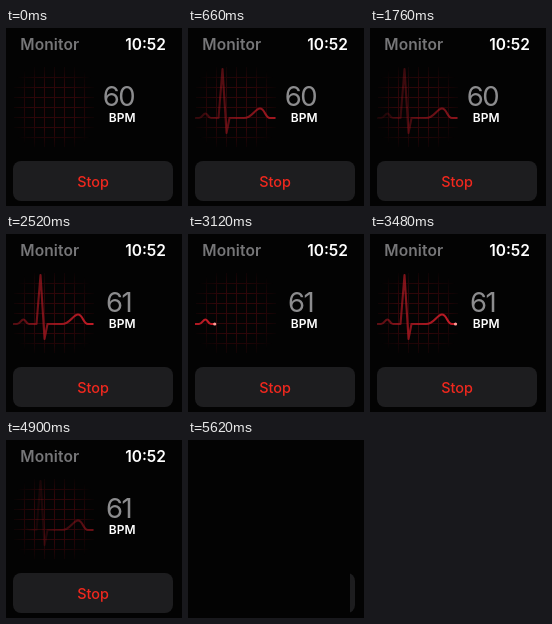
Write an HTML page that moves like this. It is 176x178 px and loops after 8 s.

```html
<!DOCTYPE html>
<html lang="en">
<head>
<meta charset="utf-8">
<title>Monitor</title>
<style>
html, body { margin: 0; width: 100%; height: 100%; overflow: hidden; background: #030303; }
svg { display: block; width: 100vw; height: 100vh; }
text { font-family: Inter, "Open Sans", sans-serif; font-weight: 600; fill: #fff; }
#rate { font-size: 27.5px; font-weight: 400; letter-spacing: -1.5px; fill: #8c8c8e; }
</style>
</head>
<body>
<svg viewBox="0 0 176 178">
  <defs>
    <linearGradient id="glow" gradientUnits="userSpaceOnUse" x1="-130" y1="0" x2="7" y2="0">
      <stop offset="0" stop-color="#c81c27" stop-opacity="0"/>
      <stop offset="1" stop-color="#c81c27"/>
      <stop offset="1" stop-color="#c81c27" stop-opacity="0"/>
    </linearGradient>
    <radialGradient id="vignette" r=".58">
      <stop offset=".5" stop-color="#fff"/>
      <stop offset="1" stop-color="#000"/>
    </radialGradient>
    <mask id="soft"><rect x="7" y="38" width="82" height="82" fill="url(#vignette)"/></mask>
  </defs>
  <g id="screen">
    <text x="14.2" y="22" font-size="15.5" letter-spacing=".15" style="fill:#767678">Monitor</text>
    <text x="160" y="22" font-size="15.5" text-anchor="end">10:52</text>
    <g mask="url(#soft)"><path id="grid" stroke="#2e0609" fill="none"/></g>
    <path id="trace" fill="none" stroke="url(#glow)" stroke-width="2.1" stroke-linejoin="round"
      d="M7 90H11C14 90 15 85.5 17.5 85.5S20 90 23 90H30.5L34.5 41L38.5 105L41.5 90H56C64 90 67 80.5 72 80.5S77 90 82 90H87.5"/>
    <circle id="head" r="1.6" fill="#ff9a96"/>
    <text id="rate" x="112.5" y="78" text-anchor="middle"></text>
    <text x="129.5" y="94" font-size="12" text-anchor="end">BPM</text>
  </g>
  <rect id="button" x="7" y="133" width="160" height="40" rx="8" fill="#1d1d1f"/>
  <text id="stop" x="87" y="159" font-size="14.4" text-anchor="middle" style="fill:#f0281e;font-weight:500">Stop</text>
</svg>
<script>
const LOOP = 8000, BEAT = 1000, SWEEP = 490, END = 5620;
const LEFT = 7, WIDTH = 80;
const el = id => document.getElementById(id);
const [screen, grid, trace, head, rate, button, stop, glow] =
  ["screen", "grid", "trace", "head", "rate", "button", "stop", "glow"].map(el);

let lines = "";
for (let i = 10; i < 80; i += 10) lines += `M${i + 8.5} 39v80M8 ${i + 39.5}h80`;
grid.setAttribute("d", lines);

// Height of the trace at x, found along the path.
const length = trace.getTotalLength();
function pointAt(x) {
  let low = 0, high = length;
  for (let i = 0; i < 16; i++) {
    const mid = (low + high) / 2;
    if (trace.getPointAtLength(mid).x < x) low = mid; else high = mid;
  }
  return trace.getPointAtLength(low);
}

function draw(now) {
  const t = now % LOOP, p = t % BEAT, on = t < END;
  screen.style.display = stop.style.display = on ? "" : "none";
  // Only the button's right edge stays on the dark screen.
  button.style.clipPath = on ? "none" : "inset(0 0 0 155px)";

  const travel = WIDTH * p / SWEEP;
  glow.setAttribute("gradientTransform", `translate(${travel} 0)`);
  trace.style.opacity = Math.min(1, (BEAT - p) / 100);

  const sweeping = p >= 40 && p < SWEEP;
  head.style.display = sweeping ? "" : "none";
  if (sweeping) {
    const at = pointAt(LEFT + travel);
    head.setAttribute("cx", at.x);
    head.setAttribute("cy", at.y);
  }

  rate.textContent = t < 2000 ? 60 : 61;
}

const start = performance.now();
function tick() {
  draw(performance.now() - start);
  requestAnimationFrame(tick);
}
tick();
</script>
</body>
</html>
```
